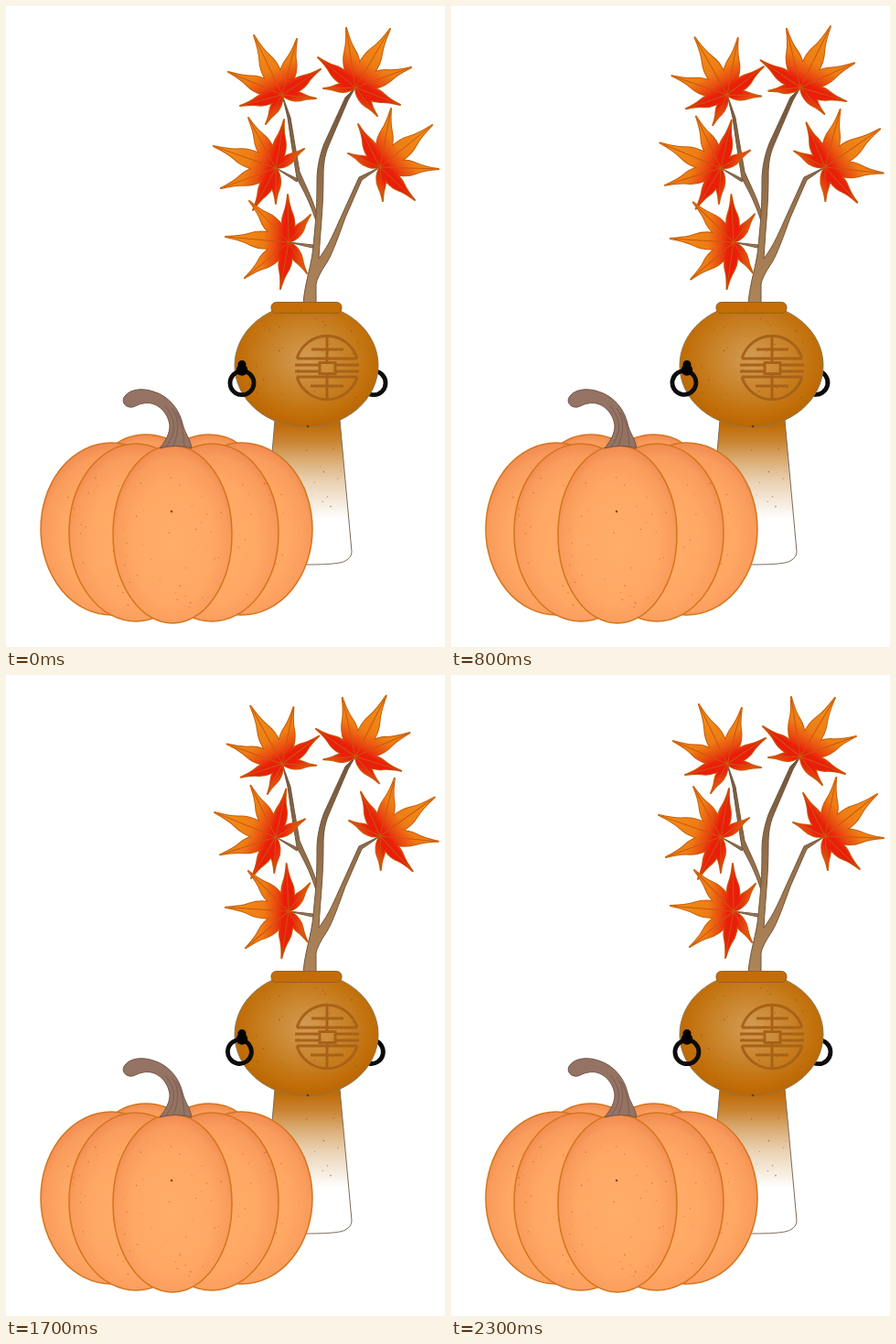
An HTML page for the animation above (2.4 s loop, 480 by 700 pixels).

```html
<!DOCTYPE html>
<html lang="en">
<head>
<meta charset="utf-8">
<title>Pumpkin and maple branch</title>
<style>
html, body { margin: 0; width: 100%; height: 100%; overflow: hidden; background: #fff; }
svg { display: block; width: 100%; height: 100%; }
</style>
</head>
<body>
<svg viewBox="0 0 480 700">
  <defs>
    <radialGradient id="pot" cx=".5" cy=".45" r=".56">
      <stop offset="0" stop-color="#d39b56"/>
      <stop offset=".4" stop-color="#ca8730"/>
      <stop offset=".78" stop-color="#c2710c"/>
      <stop offset="1" stop-color="#ba6502"/>
    </radialGradient>
    <linearGradient id="stand" gradientUnits="userSpaceOnUse" x1="0" y1="458" x2="0" y2="560">
      <stop offset="0" stop-color="#c06c08"/>
      <stop offset=".17" stop-color="#c98432"/>
      <stop offset=".36" stop-color="#d9aa70"/>
      <stop offset=".6" stop-color="#ead1b2"/>
      <stop offset="1" stop-color="#fff"/>
    </linearGradient>
    <linearGradient id="bark" gradientUnits="userSpaceOnUse" x1="0" y1="100" x2="0" y2="324">
      <stop offset="0" stop-color="#74563c"/>
      <stop offset=".6" stop-color="#a0784e"/>
      <stop offset="1" stop-color="#ad8458"/>
    </linearGradient>
    <radialGradient id="skin" cx=".5" cy=".55" r=".56">
      <stop offset="0" stop-color="#ffad68"/>
      <stop offset=".6" stop-color="#ffa864"/>
      <stop offset=".85" stop-color="#f99c5c"/>
      <stop offset="1" stop-color="#f08850"/>
    </radialGradient>
  </defs>

  <!-- branch -->
  <g fill="url(#bark)" stroke="#705640" stroke-width="1" stroke-linejoin="round">
    <path d="M340 238C332 212 323 198 318 188L312 150 308 122 302 97 311 122 316 152 321 181C327 195 334 208 339 224Z"/>
    <path d="M295 177L319 189 318 192ZM309 258L336 261 335 264Z"/>
    <path d="M325 325C327 300 334 285 336 262C339 230 340 222 340 190C340 175 344 160 348 150L371 100 382 89 374 103 353 152C348 164 347 174 347 186C347 220 344 240 342 276C354 260 360 244 366 231L386 187 409 176 389 190 371 231C364 250 358 268 351 280Q340 296 339 304L339 325Z"/>
  </g>
  <g id="leaves"></g>

  <!-- vase -->
  <path d="M294 452L290 500 283 610H330C350 610 366 609 371 606Q378 602 378 596L365 452Z" fill="url(#stand)" stroke="#7b6a58"/>
  <g class="ring" data-x="402"></g>
  <ellipse cx="328.5" cy="392.5" rx="78.5" ry="67.5" fill="url(#pot)" stroke="#8c7850"/>
  <rect x="290" y="323.5" width="77" height="12" rx="5.5" fill="#c46c06" stroke="#946026"/>
  <g fill="none" stroke="#a86218" stroke-width="3">
    <path d="M318 385A34.500 35 0 0 1 384 385M318 405A34.500 35 0 0 0 384 405"/>
    <path d="M351 360V388M351 402V430M334 375H369M318 385H384M316 392H343M316 399H343M360 392H386M360 399H386M318 405H384M333 415H369"/>
    <rect x="343" y="389.500" width="17" height="12"/>
  </g>
  <g id="potDots"></g>
  <g class="ring" data-x="258"></g>
  <circle cx="258" cy="391.500" r="4.500"/>
  <circle cx="258" cy="397.500" r="6.200"/>

  <!-- pumpkin -->
  <g id="pumpkin" fill="url(#skin)" stroke="#d4751c" stroke-width="1.500"></g>
  <g id="skinDots"></g>
  <path d="M168 483C175 474 179 467 179 458C177 442 163 431 150 434C143 435 140 439 135 438C129 437 126 431 130 426C136 418 150 417 161 421C179 426 190 442 193 456C196 468 201 471 203 483Q186 478 168 483Z" fill="#957363" stroke="#715548"/>
  <path d="M175 481C187 466 186 451 174 437M183 480C190 464 189 449 181 439M195 481C194 464 191 452 186 444" fill="none" stroke="#785a50" stroke-width=".9"/>
</svg>
<script>
const $ = id => document.getElementById(id);
const TAU = 2 * Math.PI;

function add(parent, tag, attrs) {
  const el = document.createElementNS("http://www.w3.org/2000/svg", tag);
  for (const k in attrs) el.setAttribute(k, attrs[k]);
  return parent.appendChild(el);
}

// Each leaf: pivot, swing in degrees, seven lobe tips (the middle one is the longest)
const leaves = [
  { at: [302, 97], swing: -5.3, tips: [339,101, 344,69, 318,36, 271,32, 243,72, 256,109, 284,129] },
  { at: [382, 89], swing: -6, tips: [347,90, 341,56, 372,24, 420,25, 443,67, 431,108, 406,120] },
  { at: [295, 177], swing: 4, tips: [326,156, 304,124, 265,122, 227,153, 235,199, 270,223, 295,216] },
  { at: [409, 176], swing: 5.5, tips: [374,161, 385,129, 421,112, 466,130, 473,178, 447,212, 412,213] },
  { at: [309, 258], swing: -2.3, tips: [333,228, 308,206, 266,213, 240,252, 261,297, 300,309, 329,292] }
];
const leafStops = [[0, "#f29418"], [.4, "#ee7c14"], [.53, "#ea4a10"], [.61, "#ea1e0a"], [.71, "#ea1e0a"], [.8, "#ea4a0e"], [1, "#ec7612"]];

leaves.forEach((leaf, n) => {
  const [px, py] = leaf.at;
  const g = leaf.el = add($("leaves"), "g", {});
  const mx = leaf.tips[6], my = leaf.tips[7];
  const grad = add(g, "linearGradient", {
    id: "leaf" + n, gradientUnits: "userSpaceOnUse",
    x1: mx, y1: my, x2: px - (mx - px) / 2, y2: py - (my - py) / 2
  });
  for (const [offset, color] of leafStops) add(grad, "stop", { offset, "stop-color": color });

  let shape = "", veins = "";
  for (let i = 0; i < 14; i += 2) {
    const dx = leaf.tips[i] - px, dy = leaf.tips[i + 1] - py;
    // u runs along the lobe, v across it
    const pt = (u, v) => `${(px + u * dx - v * dy).toFixed(1)} ${(py + u * dy + v * dx).toFixed(1)} `;
    shape += `M${pt(0, 0)}C${pt(.18, .15)}${pt(.45, .16)}${pt(.62, .085)}Q${pt(.75, .028)}${pt(1, 0)}` +
      `Q${pt(.75, -.028)}${pt(.62, -.085)}C${pt(.45, -.16)}${pt(.18, -.15)}${pt(0, 0)}Z`;
    veins += `M${px} ${py}L${pt(.95, 0)}`;
  }
  add(g, "path", { d: shape, fill: "none", stroke: "#c45e0a", "stroke-width": 2, "stroke-linejoin": "round" });
  add(g, "path", { d: shape, fill: `url(#leaf${n})` });
  add(g, "path", { d: veins, fill: "none", stroke: "#c9560e", "stroke-width": 1 });
});

const rings = [...document.querySelectorAll(".ring")];
for (const ring of rings)
  add(ring, "circle", { cx: ring.dataset.x, cy: 411.7, r: 13, fill: "none", stroke: "#0c0c0c", "stroke-width": 4.8 });

// Pumpkin segments, back to front
for (const [cx, cy, rx, ry] of [
  [153, 520, 55, 52], [222, 520, 55, 52], [115, 571, 77, 94], [258, 571, 77, 94],
  [142, 575, 73, 97], [225, 575, 73, 97], [182, 577, 65, 97]
]) add($("pumpkin"), "ellipse", { cx, cy, rx, ry });

let seed = 7;
const rand = () => (seed = seed * 16807 % 2147483647) / 2147483647;

function speckle(group, count, cx, cy, rx, ry, color) {
  for (let i = 0; i < count; i++) {
    const a = rand() * TAU, r = Math.sqrt(rand());
    add(group, "circle", {
      cx: cx + rx * r * Math.cos(a), cy: cy + ry * r * Math.sin(a),
      r: .35 + rand() * .5, fill: color, opacity: .75
    });
  }
}
speckle($("skinDots"), 85, 186, 575, 140, 86, "#cc681c");
speckle($("potDots"), 35, 328, 392, 72, 61, "#9c5208");
speckle($("potDots"), 16, 345, 530, 22, 70, "#a85a20");
add($("skinDots"), "circle", { cx: 181, cy: 552, r: 1.2, fill: "#8c3c10" });
add($("potDots"), "circle", { cx: 330, cy: 459, r: 1.3, fill: "#6c3808" });

function draw() {
  const step = Math.floor(performance.now() / 100) % 24;
  const p = (1 - Math.cos(TAU * step / 24)) / 2;
  for (const { el, at, swing } of leaves) el.setAttribute("transform", `rotate(${swing * p} ${at})`);
  for (const ring of rings) ring.setAttribute("transform", `rotate(${16 * p} ${ring.dataset.x} 397)`);
  requestAnimationFrame(draw);
}
draw();
</script>
</body>
</html>
```
